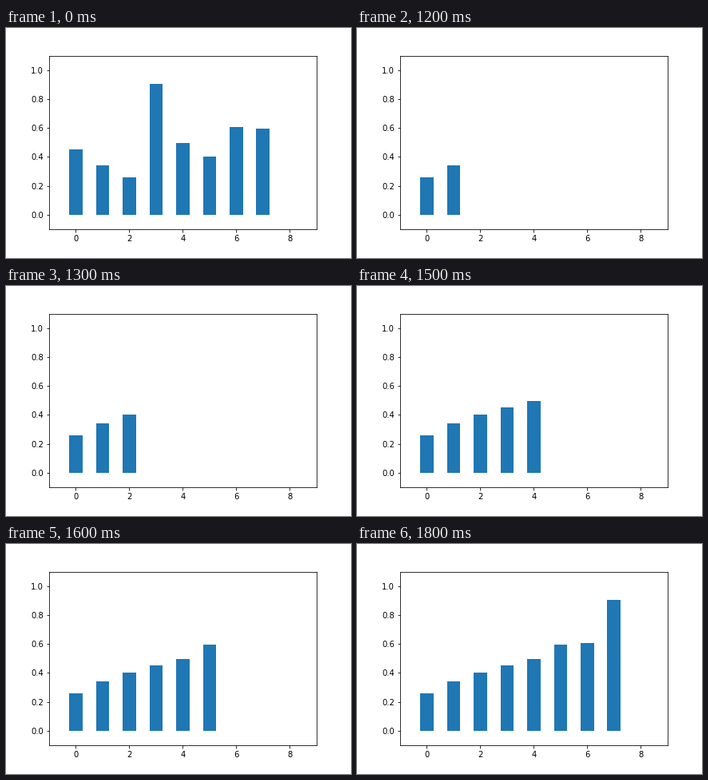
Recreate the animation shown at these times as a matplotlib script. Size 432 by 288 pixels, loop 2.9 s.

```python
import numpy as np
import matplotlib.pyplot as plt
from matplotlib.animation import FuncAnimation

STEP = 100      # ms per frame
FRAMES = 29
HOLD = 11       # frames showing the unsorted data

values = np.array([0.452, 0.341, 0.259, 0.905, 0.496, 0.402, 0.606, 0.595])
ordered = np.sort(values)

plt.rcParams.update({"font.family": "DejaVu Sans", "font.size": 10})
fig, ax = plt.subplots(figsize=(6, 4), dpi=72, facecolor="white")
fig.subplots_adjust(left=0.125, right=0.9, bottom=0.125, top=0.88)
ax.set_xlim(-1, 9)
ax.set_ylim(-0.1, 1.1)
ax.set_xticks(range(0, 9, 2))
ax.set_yticks(np.arange(6) / 5)

bars = ax.bar(range(len(values)), values, width=0.5, color="#1f77b4")


def update(frame):
    """Show the raw data, then the sorted bars one at a time."""
    is_sorted = frame >= HOLD
    heights = ordered if is_sorted else values
    shown = frame - HOLD + 1 if is_sorted else len(values)
    for i, (bar, height) in enumerate(zip(bars, heights)):
        bar.set_height(height)
        bar.set_visible(i < shown)
    return bars.patches


anim = FuncAnimation(fig, update, frames=FRAMES, interval=STEP,
                     repeat=True, repeat_delay=0, blit=False)
plt.show()
```
